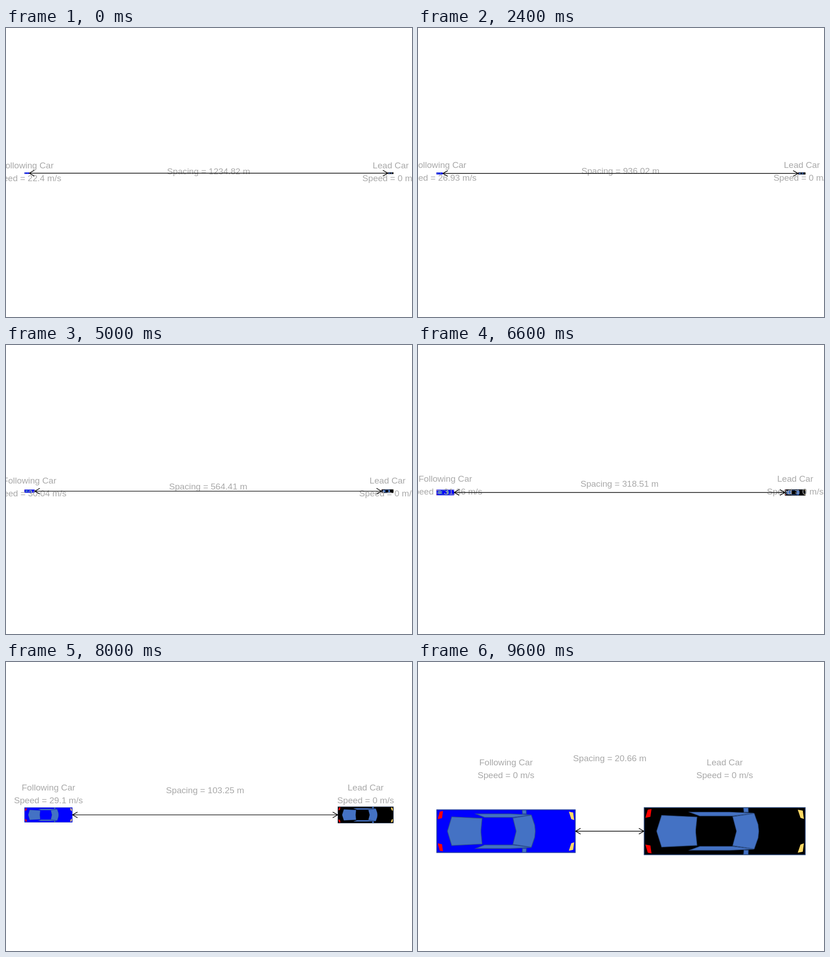
Recreate the animation shown at these times as an HTML page with a canvas. Size 885 px wide and 632 px high, loop 9.8 s.

```html
<!DOCTYPE html>
<html lang="en">
<head>
<meta charset="utf-8">
<title>Car following</title>
<style>
  html, body { margin: 0; width: 100%; height: 100%; overflow: hidden; background: #fff; }
  canvas { display: block; }
</style>
</head>
<body>
<canvas id="stage" width="885" height="632"></canvas>
<script>
const ctx = document.getElementById("stage").getContext("2d");
const STEP = 200, STEPS = 49;
const LEFT = 40.2, RIGHT = 844.7;
const GLASS = "#4472c4", EDGE = "#2f528f", RED = "#ff0000", YELLOW = "#ffd966";

// Key moments of the approach: [second, spacing in m, speed in m/s]
const keys = [
  [0, 1234.82, 22.4], [12, 936.02, 26.93], [33, 318.51, 31.36], [37, 194.13, 30.95],
  [40, 103.25, 29.1], [43, 34.49, 12.41], [45, 22.1, 1.4], [48, 20.66, 0]
];

// Cubic Hermite curve of the spacing; its slope is the closing speed
function stateAt(second) {
  const i = Math.max(1, keys.findIndex(k => k[0] >= second));
  const [t0, s0, v0] = keys[i - 1], [t1, s1, v1] = keys[i];
  const h = t1 - t0, u = (second - t0) / h, mean = (s0 - s1) / h;
  const b = 3 * mean - 2 * v0 - v1, c = v0 + v1 - 2 * mean;
  return {
    spacing: s0 - h * u * (v0 + u * (b + u * c)),
    speed: v0 + u * (2 * b + 3 * u * c)
  };
}

const mirror = points => points.map(([x, y]) => [x, 100 - y]);

// Points are percentages of the body; the lower half mirrors the upper one
function drawCar(x, axis, w, h, color, scale) {
  const y = axis - h / 2;
  const shape = (fill, points) => {
    ctx.beginPath();
    for (const [px, py] of points) ctx.lineTo(x + px * w / 100, y + py * h / 100);
    ctx.closePath();
    ctx.fillStyle = fill;
    ctx.fill();
    if (fill === GLASS) ctx.stroke();
  };
  const pair = (fill, points) => {
    shape(fill, points);
    shape(fill, mirror(points));
  };
  const symmetric = half => shape(GLASS, [...half, ...mirror(half).reverse()]);

  ctx.lineWidth = scale * 0.075;
  ctx.strokeStyle = EDGE;
  ctx.fillStyle = color;
  ctx.fillRect(x, y, w, h);
  ctx.strokeRect(x + ctx.lineWidth / 2, y + ctx.lineWidth / 2, w - ctx.lineWidth, h - ctx.lineWidth);

  symmetric([[8, 49], [11, 17], [32.8, 20.5], [32, 47]]);
  pair(GLASS, [[28.4, 10.2], [53, 10.2], [67.9, 12.5], [55, 18], [34.6, 18]]);
  symmetric([[57.3, 49], [55, 19.7], [68.2, 13], [70.6, 36], [71, 49]]);
  pair(GLASS, [[61.7, 1.3], [64.5, 1.3], [64.6, 10], [61.9, 10]]);
  pair(RED, [[0.9, 22], [2.4, 5], [4.7, 3.5], [4, 20]]);
  pair(YELLOW, [[95.2, 5], [98.3, 7], [99, 24.5], [96.9, 22]]);
}

function drawArrow(x0, x1, y) {
  ctx.strokeStyle = "#000";
  ctx.lineWidth = 1.42;
  ctx.beginPath();
  ctx.moveTo(x0, y);
  ctx.lineTo(x1, y);
  for (const [x, dx] of [[x0, 11], [x1, -11]]) {
    ctx.moveTo(x + dx, y - 6.3);
    ctx.lineTo(x, y);
    ctx.lineTo(x + dx, y + 6.3);
  }
  ctx.stroke();
}

function label(x, y, ...lines) {
  lines.forEach((line, i) => ctx.fillText(line, x, y + 6.6 + 28 * i));
}

function draw(second) {
  const { spacing, speed } = stateAt(second);
  const round = v => +v.toFixed(2);
  const scale = (RIGHT - LEFT) / (spacing + 22.85);
  const followW = 16.4 * scale, leadW = 19.05 * scale;
  const front = LEFT + followW, rear = RIGHT - leadW;
  const axis = 315.6 + 2.94 * scale, nameY = 303 - 4.5 * scale;

  ctx.fillStyle = "#fff";
  ctx.fillRect(0, 0, 885, 632);
  drawCar(LEFT, axis, followW, 5.13 * scale, "#0000ff", scale);
  drawCar(rear, axis, leadW, 5.65 * scale, "#000", scale);

  ctx.font = "19.1px Arial, 'Liberation Sans', sans-serif";
  ctx.textAlign = "center";
  ctx.fillStyle = "#a9a9a9";
  label(LEFT + followW / 2, nameY, "Following Car", `Speed = ${round(speed)} m/s`);
  label(RIGHT - leadW / 2, nameY, "Lead Car", "Speed = 0 m/s");
  label((front + rear) / 2, 317 - 5.75 * scale, `Spacing = ${round(spacing)} m`);

  drawArrow(front, rear, axis);
}

function tick() {
  draw(Math.floor(performance.now() / STEP) % STEPS);
  requestAnimationFrame(tick);
}
tick();
</script>
</body>
</html>
```
